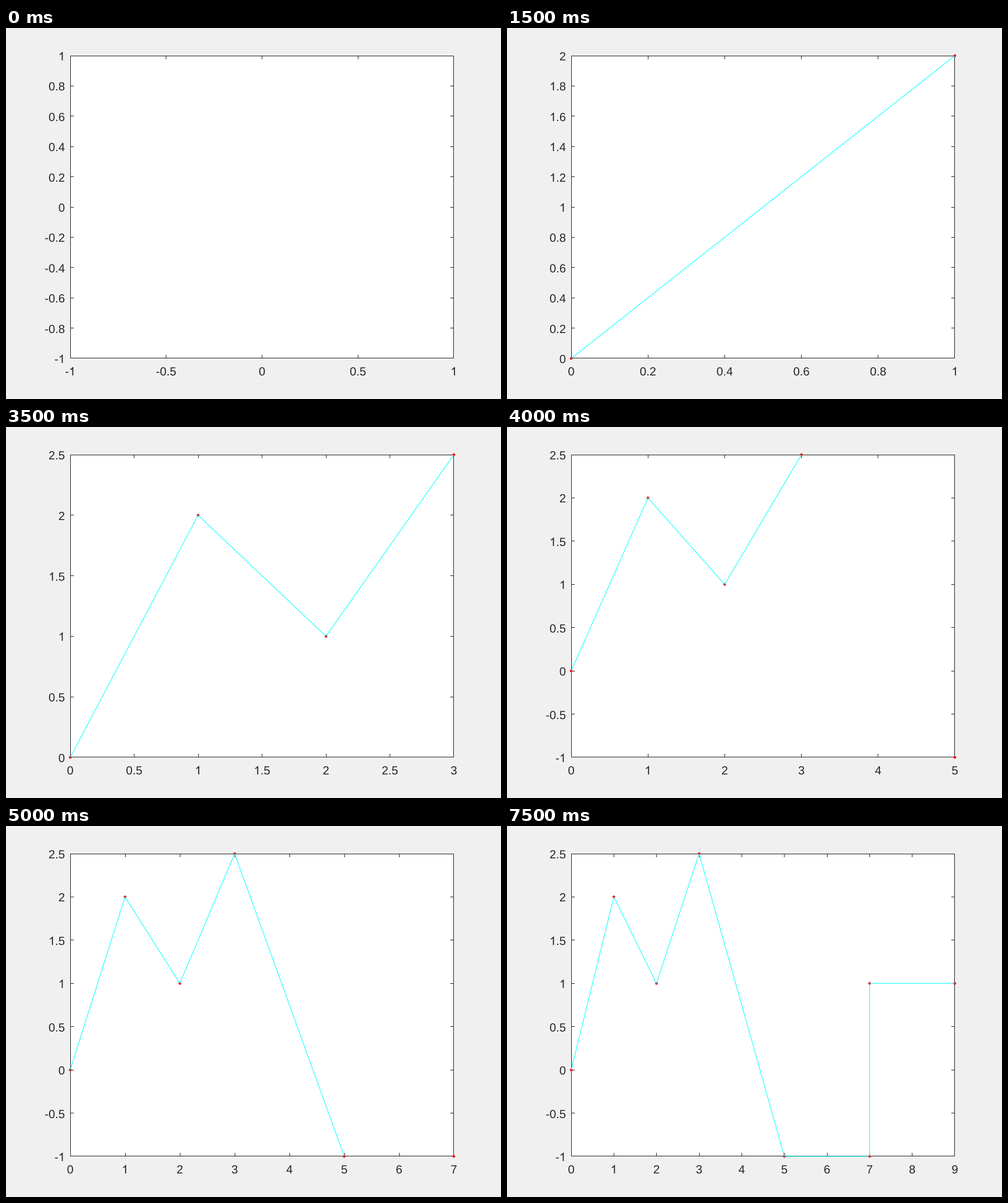
A matplotlib script that plays this animation: 840x630 px, repeating every 8000 ms.

```python
import math
import numpy as np
import matplotlib.pyplot as plt
from matplotlib.animation import ArtistAnimation
from matplotlib.lines import Line2D
from matplotlib.patches import Circle, PathPatch, Rectangle
from matplotlib.path import Path
from matplotlib.textpath import TextPath
from matplotlib.transforms import Affine2D

W, H, DPI = 840, 630, 100
LEFT, RIGHT, TOP, BOTTOM = 109, 760, 47, 561
INK, RED, CYAN = "#262626", "red", "cyan"
FONT = {"family": "Liberation Sans"}
SIZE = 20
TICK = 6
POINTS = [(0, 0), (1, 2), (2, 1), (3, 2.5), (5, -1), (7, -1), (7, 1), (9, 1)]
ADVANCE = {".": 0.278, "-": 0.333}

# A plain "1" without a foot, in em units.
ONE = Path(np.array([(763, 0), (583, 0), (583, 1147), (505, 1080), (412, 1023),
                     (223, 930), (223, 1104), (374, 1185), (487, 1276),
                     (590, 1380), (647, 1466), (763, 1466), (763, 0)])
           * SIZE / 2048, closed=True)

fig = plt.figure(figsize=(W / DPI, H / DPI), dpi=DPI, facecolor="#f0f0f0")
ax = fig.add_axes([0, 0, 1, 1])
ax.set_xlim(0, W)
ax.set_ylim(H, 0)
ax.axis("off")


def bar(x, y, w, h, color=INK, z=1):
    return ax.add_patch(Rectangle((x, y), w, h, fc=color, lw=0, zorder=z))


def width(text):
    return SIZE * sum(ADVANCE.get(c, 0.556) for c in text)


def glyphs(text, x, y):
    """Outlines of a label whose baseline starts at (x, y)."""
    paths = []
    for c in text:
        shape = ONE if c == "1" else TextPath((0, 0), c, size=SIZE, prop=FONT)
        paths.append(shape.transformed(Affine2D().scale(1, -1).translate(x, y)))
        x += width(c)
    return paths


def limits(count):
    if count < 2:
        return (-1, 1), (-1, 1)
    xs, ys = zip(*POINTS[:count])
    return (min(xs), max(xs)), (min(ys), max(ys))


def tick_values(lo, hi, step):
    return [round(lo + k * step, 1) + 0.0
            for k in range(round((hi - lo) / step) + 1)]


def draw(count, segments):
    """Axes with the first points and the lines that join them."""
    (x0, x1), (y0, y1) = limits(count)
    x_step = 0.2 if x1 - x0 <= 1 else 0.5 if x1 - x0 <= 3 else 1
    y_step = 0.2 if y1 - y0 <= 2 else 0.5

    def px(x):
        return LEFT + (RIGHT - LEFT) * (x - x0) / (x1 - x0)

    def py(y):
        return BOTTOM - (BOTTOM - TOP) * (y - y0) / (y1 - y0)

    artists, labels = [], []
    for v in tick_values(x0, x1, x_step):
        text, x = f"{v:g}", px(v)
        col = min(math.floor(x + 1e-6), RIGHT - 1)
        artists += [bar(col, TOP, 1, TICK), bar(col, BOTTOM - TICK, 1, TICK)]
        labels += glyphs(text, x - width(text) / 2, 590)
    for v in tick_values(y0, y1, y_step):
        text, y = f"{v:g}", py(v)
        row = min(math.floor(y + 1e-6), BOTTOM - 1)
        artists += [bar(LEFT, row, TICK, 1), bar(RIGHT - TICK, row, TICK, 1)]
        labels += glyphs(text, 100 - width(text), round(y + 8))
    artists.append(ax.add_patch(
        PathPatch(Path.make_compound_path(*labels), fc=INK, lw=0)))

    pixels = [(px(x), py(y)) for x, y in POINTS[:count]]
    for i, p in enumerate(pixels):
        artists.append(ax.add_patch(
            Circle(p, 2.25, fc=RED, lw=0, zorder=3 + 2 * i)))
    for i in range(segments):
        xs, ys = zip(*pixels[i:i + 2])
        line = Line2D(xs, ys, color=CYAN, lw=72 / DPI, snap=False,
                      solid_capstyle="butt", zorder=6 + 2 * i)
        artists.append(ax.add_line(line))
    return artists


bar(LEFT, TOP, RIGHT - LEFT, BOTTOM - TOP, "white", 0)
for row in (TOP, BOTTOM - 1):
    bar(LEFT, row, RIGHT - LEFT, 1)
for col in (LEFT, RIGHT - 1):
    bar(col, TOP, 1, BOTTOM - TOP)

# Each step adds a point, then the line that leads to it.
stages = [(0, 0), (1, 0)]
for n in range(2, len(POINTS) + 1):
    stages += [(n, n - 2), (n, n - 1)]

anim = ArtistAnimation(fig, [draw(*s) for s in stages], interval=500,
                       repeat=True, repeat_delay=0)
plt.show()
```
